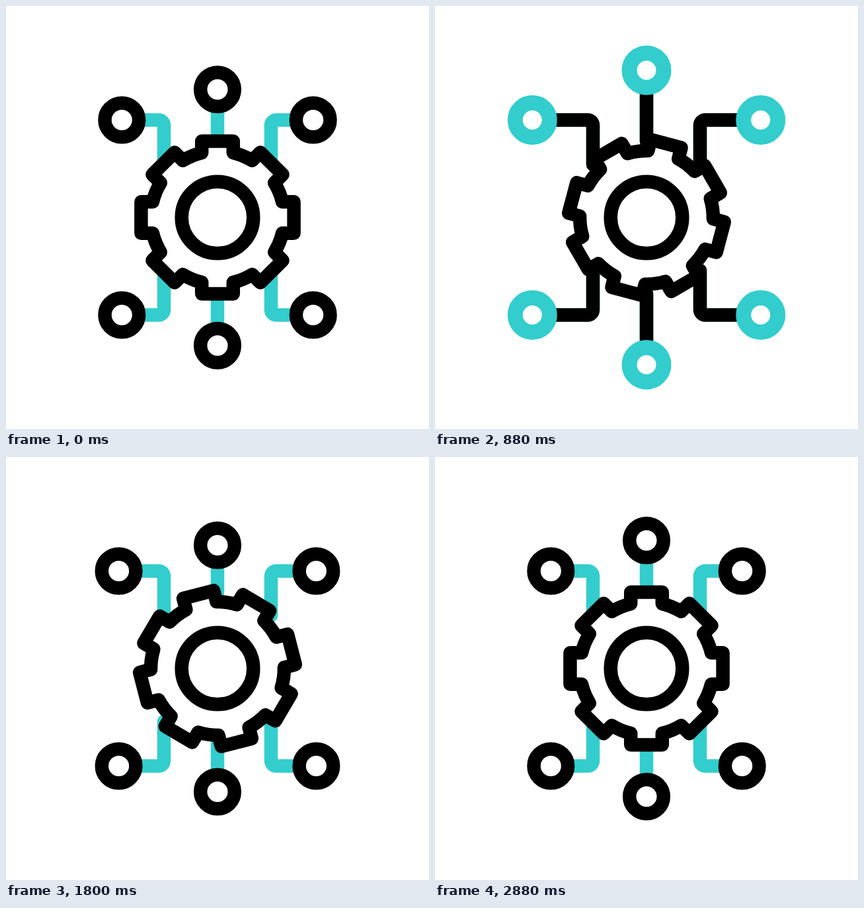
These frames come from a looping animation (640x640 px, 3000 ms). An HTML page with a canvas:

```html
<!DOCTYPE html>
<html lang="en">
<head>
<meta charset="utf-8">
<title>Gear network</title>
<style>
  html, body { margin: 0; width: 100%; height: 100%; overflow: hidden; background: #fff; }
  canvas { display: block; }
</style>
</head>
<body>
<canvas width="640" height="640"></canvas>
<script>
const ctx = document.querySelector('canvas').getContext('2d');
const LOOP = 3000, TEAL = '#33cdcd', BLACK = '#000', LINE = 20.5;
const LAG = 34; // corner nodes trail the top and bottom ones
const ACTIVE = [560, 1700];

// [ms, px] inward shift of the nodes
const shift = curve([
  [0, 0], [270, 11], [346, 8.5], [380, 4], [506, -13], [846, -28], [1080, -33.5],
  [1420, -36.5], [1640, -36.5], [1766, -5], [1800, 7], [1880, 14], [2100, -11],
  [2160, -8.5], [2220, -4.3], [2340, 3], [2560, 0]
]);
// [ms, degrees]
const turn = curve([
  [0, 0], [380, -11], [880, -75], [1480, -176], [1800, -239.3], [2220, -304.4], [2880, -360]
]);

// Smooth curve through the keys, without overshoot
function curve(keys) {
  const last = keys.length - 1;
  const slope = i => (keys[i + 1][1] - keys[i][1]) / (keys[i + 1][0] - keys[i][0]);
  const tangent = keys.map((_, i) => {
    if (i === 0 || i === last) return 0;
    const a = slope(i - 1), b = slope(i);
    return a * b > 0 ? 2 * a * b / (a + b) : 0;
  });
  return t => {
    if (t <= keys[0][0]) return keys[0][1];
    if (t >= keys[last][0]) return keys[last][1];
    const i = keys.findIndex(k => k[0] > t) - 1;
    const [t0, v0] = keys[i], [t1, v1] = keys[i + 1];
    const h = t1 - t0, s = (t - t0) / h, r = 1 - s;
    return v0 * r * r * (1 + 2 * s) + v1 * s * s * (3 - 2 * s)
      + h * s * r * (tangent[i] * r - tangent[i + 1] * s);
  };
}

function stroke(color, width = LINE) {
  ctx.strokeStyle = color;
  ctx.lineWidth = width;
  ctx.stroke();
}

function ring(x, y, r, color, width) {
  ctx.beginPath();
  ctx.arc(x, y, r, 0, 2 * Math.PI);
  ctx.fill();
  stroke(color, width);
}

function node(x, y, active) {
  if (active) ring(x, y, 26, TEAL, 23);
  else ring(x, y, 25.8, BLACK, LINE);
}

function link(active) {
  stroke(TEAL);
  if (active) stroke(BLACK);
}

function arms(t, active) {
  const x = -144.7 + shift(t - LAG), y = -193.7 + shift(t);
  for (const sx of [1, -1]) for (const sy of [1, -1]) {
    ctx.save();
    ctx.scale(sx, sy);
    ctx.beginPath();
    ctx.moveTo(-81, -80);
    ctx.arcTo(-81, -147.5, x, -147.5, 8);
    ctx.lineTo(x + 22, -147.5);
    link(active);
    node(x, -147.5, active);
    ctx.restore();
  }
  for (const s of [1, -1]) {
    ctx.beginPath();
    ctx.moveTo(0, -115 * s);
    ctx.lineTo(0, (y + 22) * s);
    link(active);
    node(0, y * s, active);
  }
}

function gear(angle) {
  const step = Math.PI / 4, tip = 118, base = 100.9, tipHalf = 0.203, baseHalf = 0.238;
  ctx.save();
  ctx.rotate(angle * Math.PI / 180);
  ctx.beginPath();
  for (let i = 0; i < 8; i++) {
    const a = i * step;
    for (const p of [a - tipHalf, a + tipHalf])
      ctx.lineTo(tip * Math.cos(p), tip * Math.sin(p));
    ctx.arc(0, 0, base, a + baseHalf, a + step - baseHalf);
  }
  ctx.closePath();
  ctx.fill();
  stroke(BLACK);
  ctx.restore();
  ring(0, 0, 54.3, BLACK, LINE);
}

function draw(now) {
  const t = now % LOOP;
  ctx.setTransform(1, 0, 0, 1, 320, 320);
  ctx.fillStyle = '#fff';
  ctx.fillRect(-320, -320, 640, 640);
  ctx.lineJoin = ctx.lineCap = 'round';
  arms(t, t >= ACTIVE[0] && t < ACTIVE[1]);
  gear(turn(t));
}

const start = performance.now();
function tick() {
  draw(performance.now() - start);
  requestAnimationFrame(tick);
}
tick();
</script>
</body>
</html>
```
